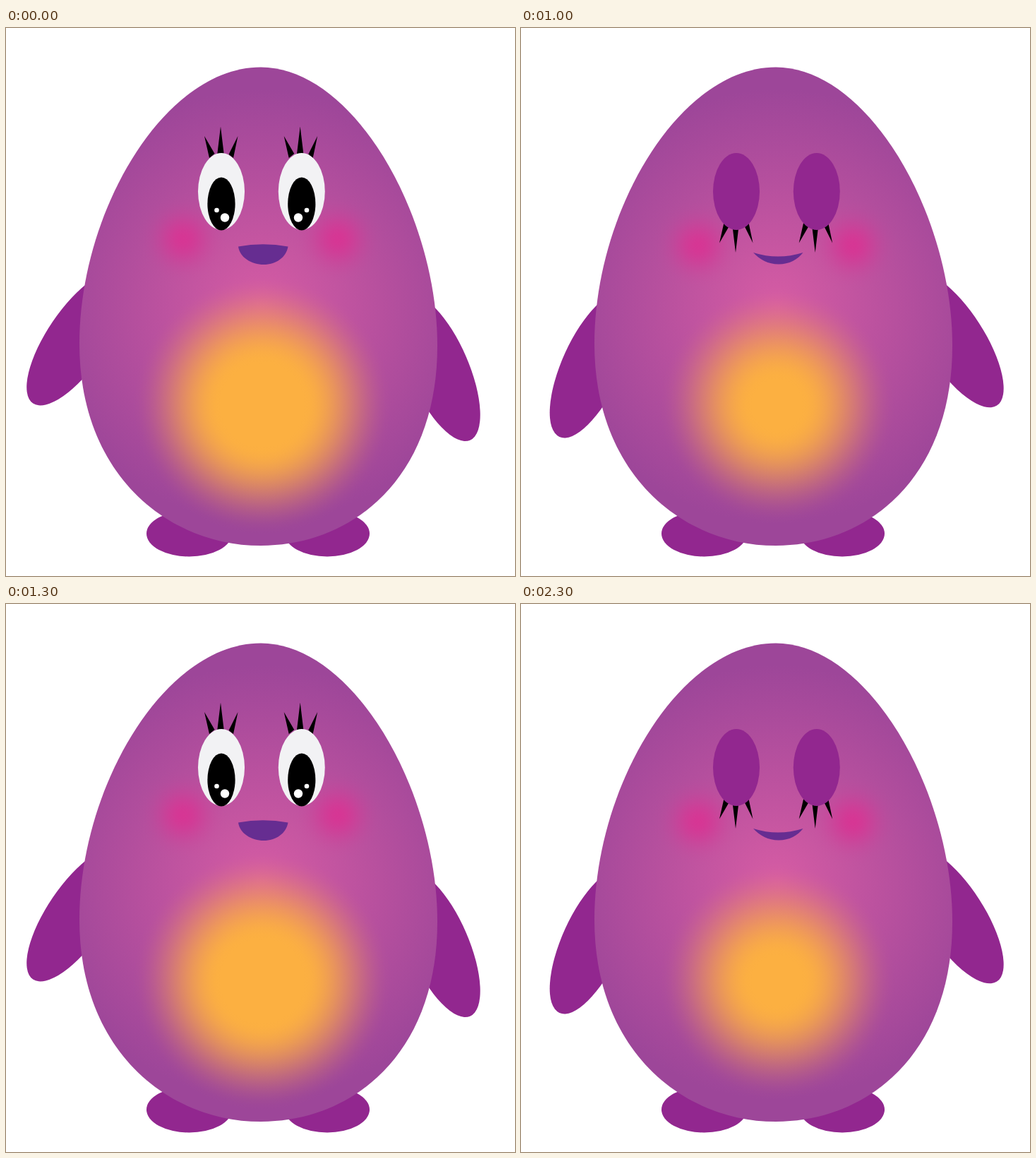
These frames come from a looping animation (721x776 px, 2600 ms). An HTML page:

```html
<!DOCTYPE html>
<html lang="en">
<head>
<meta charset="utf-8">
<title>Blinking egg</title>
<style>
  html, body { margin: 0; width: 100%; height: 100%; overflow: hidden; background: #fff; }
  svg { display: block; width: 100%; height: 100%; }
</style>
</head>
<body>
<svg viewBox="0 0 721 776">
  <defs>
    <radialGradient id="skin" gradientUnits="userSpaceOnUse" cx="362" cy="394" r="308">
      <stop offset="0" stop-color="#d65ca4"/>
      <stop offset="1" stop-color="#9d4699"/>
    </radialGradient>
    <radialGradient id="glowOpen"/>
    <radialGradient id="glowShut"/>
    <radialGradient id="blush"/>
  </defs>

  <g fill="#92278f">
    <ellipse id="armL" rx="111.500" ry="42"/>
    <ellipse id="armR" rx="111.500" ry="42"/>
    <ellipse cx="259.500" cy="716" rx="60.500" ry="32.500"/>
    <ellipse cx="455" cy="716" rx="60" ry="32.500"/>
  </g>

  <path fill="url(#skin)" d="M361 55.500C491 55.500 611 263 611 450S491 733 361 733S104 634 104 447S224 55.500 361 55.500Z"/>
  <circle id="belly" cx="363" cy="534"/>
  <g id="cheeks" fill="url(#blush)">
    <circle cx="251" r="75"/>
    <circle cx="470" r="75"/>
  </g>

  <g id="lashes">
    <path id="lash" d="M281 153L288 184L295.500 178ZM304 139.500L298.500 185H309.500ZM328.500 153L315.500 179L322 184Z"/>
    <use href="#lash" x="112.700"/>
  </g>
  <g id="eyes">
    <ellipse cx="305" cy="231.500" rx="33" ry="54.500"/>
    <ellipse cx="418.800" cy="231.500" rx="33" ry="54.500"/>
  </g>
  <g id="pupils">
    <ellipse cx="305" cy="249" rx="19.600" ry="37.500"/>
    <ellipse cx="418.800" cy="249" rx="19.600" ry="37.500"/>
    <g fill="#fff">
      <circle cx="298.500" cy="258" r="3.300"/>
      <circle cx="310" cy="268.500" r="6.200"/>
      <circle cx="426" cy="258" r="3.300"/>
      <circle cx="414" cy="268.500" r="6.200"/>
    </g>
  </g>
  <path id="mouth" fill="#662d91"/>
</svg>

<script>
const $ = id => document.getElementById(id);
const set = (id, attrs) => {
  for (const name in attrs) $(id).setAttribute(name, attrs[name]);
};

// Soft-edged disc: solid up to the core, then an S-shaped fade.
function feather(id, color, core, power = 1, steps = 16) {
  let stops = '';
  for (let i = 0; i <= steps; i++) {
    const t = i / steps;
    const alpha = (1 - t * t * (3 - 2 * t)) ** power;
    stops += `<stop offset="${core + (1 - core) * t}" stop-color="${color}" stop-opacity="${alpha}"/>`;
  }
  $(id).innerHTML = stops;
}
feather('glowOpen', '#fcb041', 0.32);
feather('glowShut', '#fcb041', 0.21);
feather('blush', '#d63694', 0, 2);

const place = (x, y, angle) => `translate(${x} ${y}) rotate(${angle})`;

const OPEN = {
  armL: { transform: place(100.9, 439.3, -55.8) },
  armR: { transform: place(612.9, 481.4, 66.5) },
  belly: { r: 184, fill: 'url(#glowOpen)' },
  cheeks: { transform: 'translate(0 299)' },
  lashes: { transform: 'translate(0 0)' },
  eyes: { fill: '#f2f2f4' },
  pupils: { visibility: 'visible' },
  mouth: { d: 'M329 309.500Q364 303 399.500 309.500C397 325 382 335 365 335S331 325 329 309.500Z' }
};
const SHUT = {
  armL: { transform: place(100.7, 477.5, -65.5) },
  armR: { transform: place(613.7, 440.9, 57.2) },
  belly: { r: 168, fill: 'url(#glowShut)' },
  cheeks: { transform: 'translate(0 308)' },
  lashes: { transform: 'translate(0 457.5) scale(1 -1)' },
  eyes: { fill: '#92278f' },
  pupils: { visibility: 'hidden' },
  mouth: { d: 'M329 318Q364 329 399.500 318C392 328 380 334.500 365 334.500S338 328 329 318Z' }
};

const OPEN_MS = 1000, CYCLE_MS = 1300;
const start = performance.now();
let shown;

function draw(ms) {
  const pose = ms % CYCLE_MS < OPEN_MS ? OPEN : SHUT;
  if (pose === shown) return;
  shown = pose;
  for (const id in pose) set(id, pose[id]);
}

function tick() {
  draw(performance.now() - start);
  requestAnimationFrame(tick);
}
tick();
</script>
</body>
</html>
```
